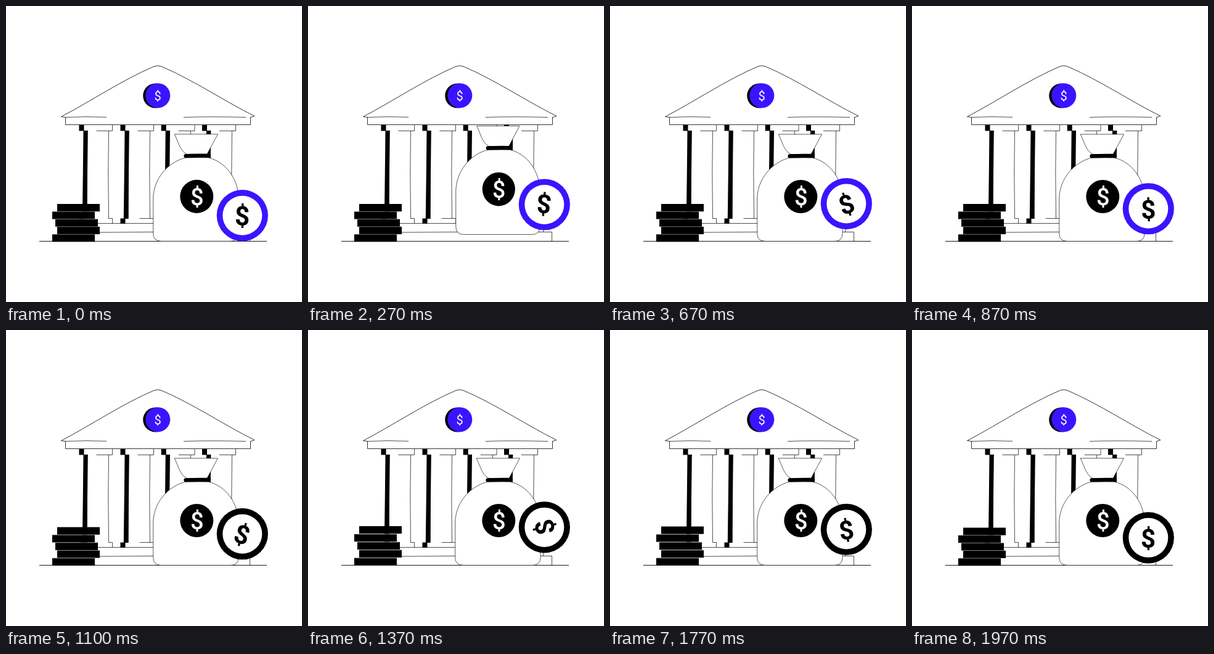
Recreate the animation shown at these times as an HTML page with a canvas. Size 480x480 px, loop 2000 ms.

```html
<!DOCTYPE html>
<html lang="en">
<head>
<meta charset="utf-8">
<title>Bank</title>
<style>
html, body { margin: 0; width: 100%; height: 100%; overflow: hidden; background: #fff; }
canvas { display: block; width: 480px; height: 480px; }
</style>
</head>
<body>
<canvas id="stage" width="480" height="480"></canvas>
<script>
const ctx = document.getElementById('stage').getContext('2d');
const BLACK = '#000', WHITE = '#fff', BLUE = '#3b14ff';
const LOOP = 2000, HOP = 1000;

// rise and fall, fast off the ground and slow at the top
const jump = p => p <= 0 || p >= 1 ? 0 : 1 - Math.abs(2 * p - 1) ** 2.6;

// cubic bezier easing with control points (x1, 0) and (x2, 1)
function ease(x, x1, x2) {
  let lo = 0, hi = 1;
  for (let i = 0; i < 20; i++) {
    const s = (lo + hi) / 2, r = 1 - s;
    if (3 * r * r * s * x1 + 3 * r * s * s * x2 + s ** 3 < x) lo = s; else hi = s;
  }
  return lo * lo * (3 - 2 * lo);
}

function trace(pts) {
  ctx.beginPath();
  for (let i = 0; i < pts.length; i += 2) ctx.lineTo(pts[i], pts[i + 1]);
}

function line(...pts) {
  trace(pts);
  ctx.stroke();
}

function poly(...pts) {
  trace(pts);
  ctx.fill();
}

function disc(x, y, rx, color, ry = rx) {
  ctx.fillStyle = color;
  ctx.beginPath();
  ctx.ellipse(x, y, rx, ry, 0, 0, Math.PI * 2);
  ctx.fill();
}

// dollar sign centred on its ink
function dollar(x, y, size, weight, color, angle = 0) {
  ctx.save();
  ctx.translate(x, y);
  ctx.rotate(angle);
  ctx.font = `${weight} ${size}px Roboto, Arial, sans-serif`;
  ctx.textAlign = 'center';
  ctx.textBaseline = 'alphabetic';
  ctx.fillStyle = color;
  const m = ctx.measureText('$');
  ctx.fillText('$', 0, (m.actualBoundingBoxAscent - m.actualBoundingBoxDescent) / 2);
  ctx.restore();
}

function column(x, side, capEnd, foot) {
  ctx.fillStyle = BLACK;
  ctx.fillRect(x, 193, 8, 9.5);
  ctx.fillRect(x, 344.5, 8, 8.5);
  poly(x + 7, 202, x + 14.3, 202, x + 13.5, 270, x + 13.2, 345, x + 5.3, 345, x + 6.3, 270);
  line(x + 28, 202.5, capEnd, 202.5, capEnd, 193);
  line(side, 203, side - 0.7, 270, side, 344.5);
  line(foot, 344.5, capEnd, 344.5, capEnd, 352.5);
}

function bank() {
  ctx.strokeStyle = BLACK;
  ctx.lineWidth = 0.8;
  ctx.beginPath();
  ctx.moveTo(97, 180.5);
  ctx.lineTo(89.5, 179.5);
  ctx.bezierCurveTo(135, 156, 190, 119, 240, 98);
  ctx.quadraticCurveTo(246, 95.5, 252, 98);
  ctx.bezierCurveTo(302, 119, 357, 156, 403, 178.5);
  ctx.lineTo(396.5, 180.5);
  ctx.stroke();
  line(96.5, 180.5, 96.5, 192.5, 396.5, 192.5, 396.5, 180);
  ctx.lineWidth = 0.7;
  ctx.beginPath();
  ctx.moveTo(97, 180.5);
  ctx.quadraticCurveTo(130, 178.8, 163, 180.3);
  ctx.moveTo(288, 180.5);
  ctx.quadraticCurveTo(330, 179, 389, 180.5);
  ctx.stroke();

  disc(242.5, 145.5, 20.3, BLACK, 20);
  disc(246.3, 145.2, 20, BLUE, 20);
  dollar(246.2, 145.4, 20, 400, WHITE);

  column(118.5, 166.5, 172.5, 166.5);
  column(185.5, 233.5, 239.5, 216.5);
  column(251.7, 299.5, 306, 283);
  column(318, 366.5, 372.5, 350);

  line(110, 352.5, 381.5, 352.5, 381.5, 366.5);
  line(96, 367.5, 200, 366.8, 240, 366.5, 395.5, 366.5, 395.5, 381.5);
  ctx.lineWidth = 0.9;
  line(54, 381.5, 423, 381.5);
}

function stack(lift) {
  [83, 75, 80, 83, 75].forEach((x, i) => {
    const y = 321 + i * 12.3 - lift * (5 - i) / 5;
    ctx.fillStyle = BLACK;
    ctx.fillRect(x, y, 69, 12.2);
    if (i) {
      ctx.strokeStyle = '#aaa';
      ctx.lineWidth = 0.5 + 0.3 * lift / 3;
      line(x, y, x + 69, y);
    }
  });
}

function bag(h) {
  ctx.save();
  ctx.translate(308, 381.5 - 11 * h);
  ctx.scale(1 - 0.015 * h, 1 + 0.014 * h);
  ctx.translate(-308, -381.5);
  ctx.fillStyle = WHITE;
  ctx.strokeStyle = BLACK;
  ctx.lineWidth = 0.65;

  ctx.beginPath();
  ctx.moveTo(273, 208);
  ctx.bezierCurveTo(279, 218, 281, 234, 293, 240.5);
  ctx.lineTo(326, 240.5);
  ctx.lineTo(343.5, 208);
  ctx.closePath();
  ctx.fill();
  ctx.stroke();

  ctx.beginPath();
  ctx.moveTo(292, 246);
  ctx.bezierCurveTo(262, 253, 238.7, 281, 238.7, 313);
  ctx.lineTo(238.7, 369);
  ctx.quadraticCurveTo(238.7, 381.5, 252, 381.5);
  ctx.lineTo(364, 381.5);
  ctx.quadraticCurveTo(377, 381.5, 377, 369);
  ctx.lineTo(377, 313);
  ctx.bezierCurveTo(377, 281, 357, 253, 328, 246);
  ctx.closePath();
  ctx.fill();
  ctx.stroke();

  ctx.lineWidth = 6.3;
  ctx.lineCap = 'round';
  ctx.beginPath();
  ctx.moveTo(291.5, 243.3);
  ctx.quadraticCurveTo(310, 242.5, 329, 243);
  ctx.stroke();

  disc(309.3, 309, 27, BLACK);
  dollar(309.7, 309, 38, 500, WHITE);
  ctx.restore();
}

function coin(p, color) {
  const y = 339.8 - 20.5 * jump(p);
  disc(383.3, y, 41.6, color);
  disc(383.3, y, 32, WHITE);
  dollar(383, y, 42, 600, BLACK, Math.PI * 2 * ease(p, 0.32, 0.06));
}

function draw(t) {
  const second = t >= HOP;
  const p = (t % HOP) / HOP;
  ctx.fillStyle = WHITE;
  ctx.fillRect(0, 0, 480, 480);
  bank();
  stack(second ? 3 * jump(p) : 0);
  bag(jump(t / 500));
  coin(p, second ? BLACK : BLUE);
}

const start = performance.now();
function tick() {
  draw((performance.now() - start) % LOOP);
  requestAnimationFrame(tick);
}
tick();
</script>
</body>
</html>
```
